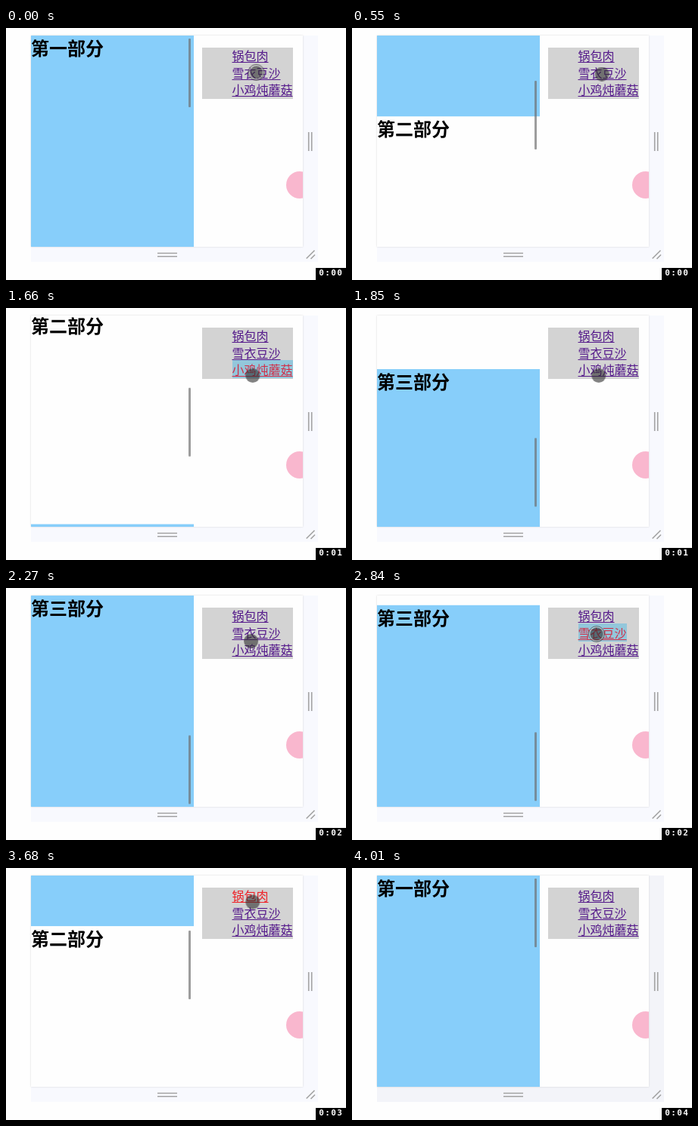
Write an HTML page that moves like this. It is 449 by 334 pixels and loops after 4420 ms.

```html
<!DOCTYPE html>
<html lang="zh-CN">
<head>
<meta charset="utf-8">
<title>锚点滚动</title>
<style>
  html, body { margin: 0; width: 449px; height: 334px; overflow: hidden; background: #fefefe; }
  body { position: relative; font-family: "Noto Sans CJK SC", "Noto Sans CJK", "Noto Sans CJK JP", sans-serif; }
  body * { box-sizing: border-box; animation-duration: 4420ms; animation-iteration-count: infinite; }
  div { position: absolute; }

  .frame { left: 33px; top: 10px; width: 379px; height: 300px; background: #f8f9fe; animation-name: dim; animation-timing-function: step-end; }
  .edge { left: 33px; top: 10px; width: 359px; height: 280px; background: #fefefe; box-shadow: -.5px -.5px 2px rgba(0, 0, 0, .16); }
  .view { left: 33px; top: 10px; width: 359px; height: 280px; overflow: hidden; background: #fefefe; }

  .pages { --step: -280px; left: 0; top: 0; width: 215px; animation-name: scroll; }
  h2 { margin: 0; height: 280px; font: bold 24px/32px "Noto Sans CJK SC", "Noto Sans CJK", "Noto Sans CJK JP", sans-serif; color: #000; }
  h2:nth-child(odd) { background: #87cefa; }
  .thumb { --step: 90.67px; left: 208px; top: 4px; width: 3px; height: 90.67px; border-radius: 1px; background: rgba(110, 110, 110, .68); animation-name: scroll; }

  .menu { left: 225.5px; top: 16px; width: 120px; height: 67.5px; padding-left: 40px; background: #d3d3d3; font-size: 16px; line-height: 22.5px; white-space: nowrap; }
  .menu span { color: #551a8b; text-decoration: underline 1px; text-underline-offset: 2px; animation-timing-function: step-end; }
  .menu p { position: relative; top: -1px; margin: 0; height: 22.5px; }
  .one { animation-name: tapOne; }
  .two { animation-name: tapTwo; }
  .three { animation-name: tapThree; }
  .ball { left: 337px; top: 180px; width: 36px; height: 36px; border-radius: 50%; background: #f9b7ce; }

  svg { position: absolute; left: 0; top: 0; }
  .cursor { left: -9.5px; top: -9.5px; width: 19px; height: 19px; border-radius: 50%; background: rgba(40, 40, 40, .58); animation-name: move; }
  .ring { left: -1.5px; top: -1.5px; width: 22px; height: 22px; border-radius: 50%; border: 1px solid rgba(50, 50, 50, .75); box-shadow: inset 0 0 0 1.5px rgba(215, 215, 215, .7); opacity: 0; animation-name: press; animation-timing-function: step-end; }

  .clock { left: 409px; top: 318px; width: 40px; height: 16px; padding-left: 3.5px; overflow: hidden; background: #000; color: #fff; font: bold 11px/16px "DejaVu Sans Mono", monospace; display: flex; }
  .clock span { width: 8px; margin-top: -1px; text-align: center; }
  .secs { animation-name: tick; animation-timing-function: step-end; }

  @keyframes scroll {
    0%, 7.25% { transform: translateY(0); animation-timing-function: ease-in-out; }
    16.42%, 36.98% { transform: translateY(var(--step)); animation-timing-function: ease-in-out; }
    44.5%, 62.896% { transform: translateY(calc(var(--step) * 2)); animation-timing-function: ease-in-out; }
    72.059%, 80.16% { transform: translateY(var(--step)); animation-timing-function: ease-in-out; }
    89.37%, 100% { transform: translateY(0); }
  }
  @keyframes move {
    0%, 5.2% { transform: translate(330.5px, 58.8px); }
    12.44%, 24.6% { transform: translate(329.5px, 60.5px); }
    24.89% { transform: translate(329.5px, 62px); animation-timing-function: ease-in-out; }
    36.2%, 49.55% { transform: translate(325.3px, 89px); }
    52.04%, 55.43% { transform: translate(323px, 69px); }
    59%, 71.3% { transform: translate(323px, 61px); animation-timing-function: ease-in-out; }
    78.05%, 90.723% { transform: translate(325.3px, 44.5px); }
    90.724%, 100% { transform: translate(-60px, -60px); }
  }
  @keyframes press {
    0% { opacity: 1; }
    .452% { opacity: 0; }
    61.5% { opacity: .8; }
    66% { opacity: 0; }
  }
  @keyframes tapOne {
    80.09% { color: #ee2228; background: rgba(51, 181, 229, .4); }
    82.35% { color: #ee2228; background: none; }
    84.39% { color: #551a8b; }
  }
  @keyframes tapTwo {
    5.204% { color: #d0304a; background: rgba(51, 181, 229, .4); }
    9.39% { color: #ee2228; background: none; }
    11.425% { color: #551a8b; background: none; }
    61.09% { color: #d0304a; background: rgba(51, 181, 229, .4); }
    65.16% { color: #ee2228; background: none; }
    67.19% { color: #551a8b; background: none; }
  }
  @keyframes tapThree {
    36.878% { color: #d0304a; background: rgba(51, 181, 229, .4); }
    39.14% { color: #ee2228; background: none; }
    41.176% { color: #551a8b; }
  }
  @keyframes tick {
    0% { transform: translateY(0); }
    21.493% { transform: translateY(-16px); }
    45.475% { transform: translateY(-32px); }
    67.195% { transform: translateY(-48px); }
    90.724%, 100% { transform: translateY(-64px); }
  }
  @keyframes dim {
    90.724%, 100% { background: #f3f4f9; }
  }
</style>
</head>
<body>
  <div class="frame"></div>
  <div class="edge"></div>
  <div class="view">
    <div class="pages"><h2>第一部分</h2><h2>第二部分</h2><h2>第三部分</h2></div>
    <div class="thumb"></div>
    <div class="menu">
      <p><span class="one">锅包肉</span></p>
      <p><span class="two">雪衣豆沙</span></p>
      <p><span class="three">小鸡炖蘑菇</span></p>
    </div>
    <div class="ball"></div>
  </div>
  <svg width="449" height="334" fill="none" stroke="#a2a2a2" stroke-width="1.6">
    <path d="M399.700 138v25M403.700 138v25M200 298.500h26M200 302.700h26M396.700 305.500L407.500 294.700M402.500 306L408 300.500"/>
  </svg>
  <div class="cursor"><div class="ring"></div></div>
  <div class="clock">
    <span>0</span><span>:</span><span>0</span>
    <span class="secs">0<br>1<br>2<br>3<br>4</span>
  </div>
</body>
</html>
```
